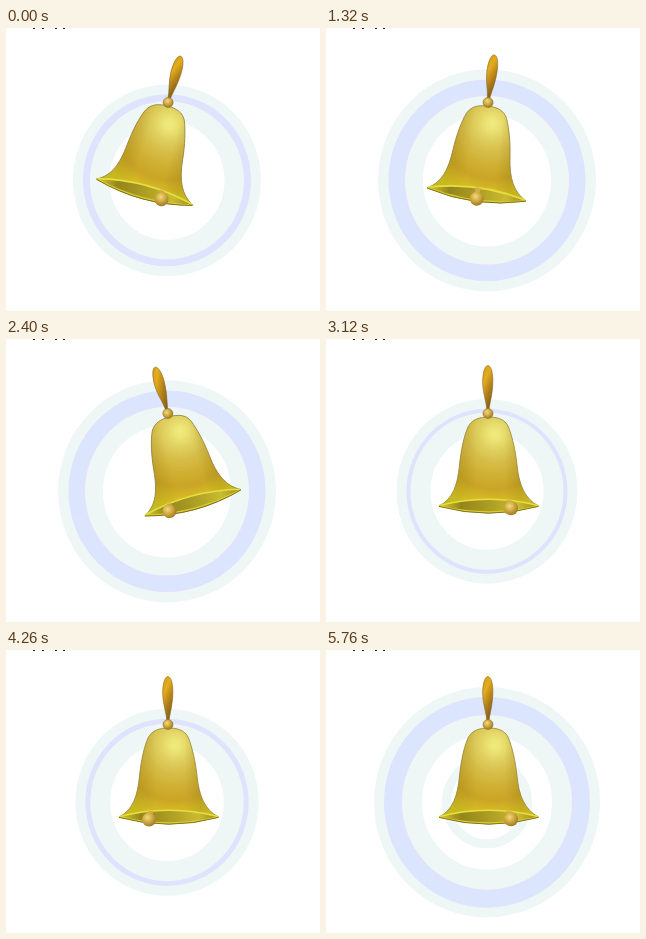
Recreate the animation shown at these times as an HTML page. Size 314x283 px, loop 5.82 s.

```html
<!DOCTYPE html>
<html lang="en">
<head>
<meta charset="utf-8">
<title>Ringing bell</title>
<style>
  html, body { margin: 0; width: 100%; height: 100%; overflow: hidden; background: #fff; }
  svg { display: block; width: 314px; height: 283px; }
</style>
</head>
<body>
<svg viewBox="0 0 314 283">
  <defs>
    <path id="skin" d="M113 167C127 160 131.500 146 133.500 126C135 111 138 97 142 88C146 80 154 78 163 78C171 78 179 80 182.500 88C186 97 189.500 111 191 126C193 146 199 160 212.500 167Q163 181 113 167Z"/>
    <radialGradient id="body" gradientUnits="userSpaceOnUse" cx="169" cy="95" r="84">
      <stop offset="0" stop-color="#efec7c"/>
      <stop offset=".07" stop-color="#ece476"/>
      <stop offset=".2" stop-color="#dfcf5e"/>
      <stop offset=".34" stop-color="#d6bd48"/>
      <stop offset=".52" stop-color="#cfae30"/>
      <stop offset=".66" stop-color="#caa526"/>
      <stop offset=".8" stop-color="#d6bc24"/>
      <stop offset=".9" stop-color="#dece26"/>
      <stop offset="1" stop-color="#d9d020"/>
    </radialGradient>
    <linearGradient id="side">
      <stop offset=".18" stop-color="#75600c" stop-opacity=".2"/>
      <stop offset=".38" stop-color="#75600c" stop-opacity="0"/>
      <stop offset=".66" stop-color="#75600c" stop-opacity="0"/>
      <stop offset=".82" stop-color="#75600c" stop-opacity=".2"/>
    </linearGradient>
    <linearGradient id="inside">
      <stop offset="0" stop-color="#d8ca2c"/>
      <stop offset=".22" stop-color="#94851c"/>
      <stop offset=".55" stop-color="#b0a126"/>
      <stop offset=".8" stop-color="#cabb32"/>
      <stop offset="1" stop-color="#9b8c1c"/>
    </linearGradient>
    <linearGradient id="handle" x2=".5" y2="1">
      <stop offset="0" stop-color="#d89a14"/>
      <stop offset=".35" stop-color="#e2ac1c"/>
      <stop offset=".65" stop-color="#b8841a"/>
      <stop offset="1" stop-color="#83601c"/>
    </linearGradient>
    <radialGradient id="ball" cx=".4" cy=".35" r=".65">
      <stop offset="0" stop-color="#f0da80"/>
      <stop offset=".5" stop-color="#d2ac44"/>
      <stop offset="1" stop-color="#a07c24"/>
    </radialGradient>
    <clipPath id="mouth"><path d="M113 167Q163 153 213 167V190H113Z"/></clipPath>
  </defs>
  <g fill="#222">
    <rect x="27" width="2" height="1"/><rect x="36" width="2" height="1"/>
    <rect x="49" width="2" height="1"/><rect x="57" width="2" height="1"/>
  </g>
  <g id="rings" fill="none"></g>
  <g id="bell">
    <path d="M162 26.500C165.500 27 167.200 35 166.800 44C166.400 56 163.700 64 163 71H160.800C160.300 62 157 55 156.700 44C156.500 35 158.500 26.500 162 26.500Z"
      fill="url(#handle)" stroke="#8a6620" stroke-width=".6"/>
    <use href="#skin" fill="url(#body)"/>
    <use href="#skin" fill="url(#side)" stroke="#93843a" stroke-width=".8" stroke-linejoin="round"/>
    <path d="M113.500 167Q163 154 212 167Q163 179 113.500 167Z" fill="url(#inside)"/>
    <g fill="none">
      <path d="M113.500 166.500Q163 154 212 166.500" stroke="#e6de40" stroke-width="1.600"/>
      <path d="M113.500 167Q163 179 212 167" stroke="#dbcd2c" stroke-width="1.500"/>
      <path d="M113 167.400Q163 181 212.500 167.400" stroke="#7c6e1c" stroke-width=".9"/>
    </g>
    <circle cx="162" cy="74.500" r="5" fill="url(#ball)" stroke="#8f7228" stroke-width=".6"/>
    <g clip-path="url(#mouth)"><path id="stem" stroke="#cfae48" stroke-width="5"/></g>
    <circle id="clapper" r="7" fill="url(#ball)"/>
  </g>
</svg>
<script>
const STEP = 60, STEPS = 97, RING_PERIOD = 27;
const PIVOT = { x: 162, y: 75 };
const CLAPPER_X = [19, 1.5, -19, -22, -24, 1, 23, 22];

// [age, inner radius, outer radius]
const PALE = [[-20, 36, 45], [-9, 51, 80], [-3, 56.5, 90.5], [0, 57.5, 94],
  [6, 64, 109], [7, 65, 113], [18, 110, 130], [21, 132, 133]];
const LAVENDER = [[-5, 77, 78], [-3, 76.5, 80.5], [0, 77, 84], [6, 82, 98.5],
  [7, 85, 103], [11, 93, 111.5], [15, 100, 113], [18, 110, 116]];

const $ = id => document.getElementById(id);
const clamp = v => Math.max(0, Math.min(1, v));

function band(keys, age) {
  const k = keys.findIndex(key => key[0] >= age);
  if (k < 0 || age < keys[0][0]) return null;
  const b = keys[k], a = keys[Math.max(0, k - 1)];
  const u = b === a ? 0 : (age - a[0]) / (b[0] - a[0]);
  return [a[1] + (b[1] - a[1]) * u, a[2] + (b[2] - a[2]) * u];
}

function ellipse(inner, outer, color, opacity = 1) {
  const r = (inner + outer) / 2;
  return `<ellipse cx="161" cy="152.3" rx="${r}" ry="${r * 1.025}" stroke="${color}"
    stroke-width="${outer - inner}" opacity="${opacity}"/>`;
}

function ring(age) {
  const pale = band(PALE, age), lavender = band(LAVENDER, age);
  let out = pale ? ellipse(...pale, "#eef7f6") : "";
  if (lavender) {
    const [inner, outer] = lavender, fade = clamp((18 - age) / 3);
    out += ellipse(inner, outer, "#e0e3fe", fade);
    if (outer - inner > 8) out += ellipse(inner + 3, outer - 1, "#dbe5fe", fade);
  }
  return out;
}

// The movie advances about three poses for every two steps, slightly slower later on.
function poseAt(step) {
  return step <= 52 ? Math.floor(step * 1.5) : 78 + Math.round((step - 52) * 16 / 11);
}

function draw(step) {
  const pose = poseAt(step), swing = pose % 8, age = pose % RING_PERIOD;
  const angle = 7.6 * (Math.abs(swing - 4) - 2);
  const x = PIVOT.x + CLAPPER_X[swing];
  const y = PIVOT.y + 96.5 - Math.abs(CLAPPER_X[swing]) * 0.1;

  $("rings").innerHTML = ring(age) + ring(age - RING_PERIOD);
  $("bell").setAttribute("transform", `rotate(${angle} ${PIVOT.x} ${PIVOT.y})`);
  $("clapper").setAttribute("cx", x);
  $("clapper").setAttribute("cy", y);
  $("stem").setAttribute("d", `M${x} ${y}L${x + (PIVOT.x - x) * 0.14} ${y - 13}`);
}

let start, shown = -1;
function tick(now) {
  start ??= now;
  const step = Math.floor((now - start) / STEP) % STEPS;
  if (step !== shown) draw(shown = step);
  requestAnimationFrame(tick);
}
draw(0);
requestAnimationFrame(tick);
</script>
</body>
</html>
```
